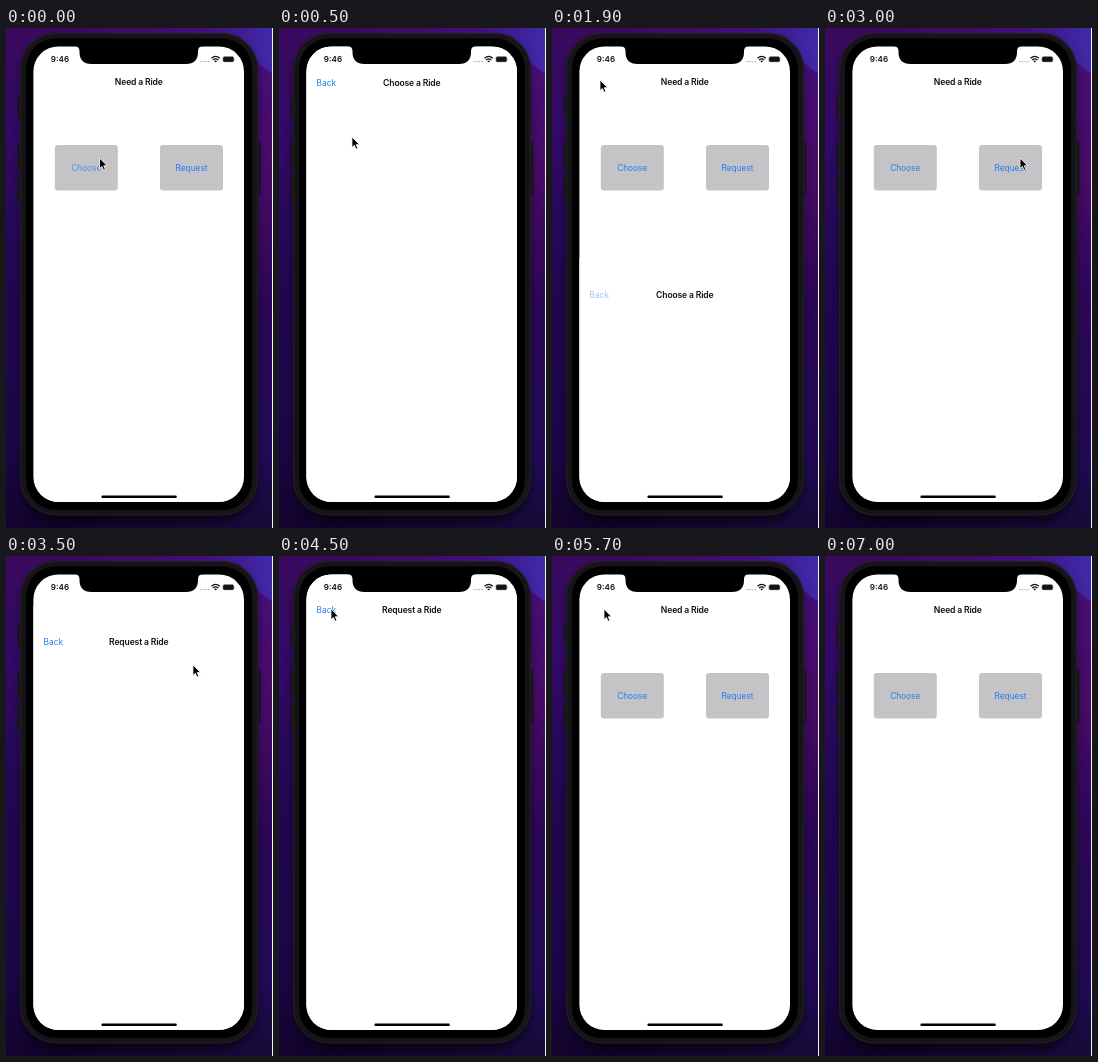
These frames come from a looping animation (267x500 px, 7.1 s). An HTML page:

```html
<!DOCTYPE html>
<html lang="en">
<head>
<meta charset="utf-8">
<title>Need a Ride</title>
<style>
  html, body { margin: 0; width: 100%; height: 100%; overflow: hidden; background: #1a0b40; }
  svg { display: block; width: 100%; height: 100%; }
  text { font: 400 8.3px Inter, Roboto, sans-serif; fill: #1f7cf2; }
  .title { font-weight: 600; font-size: 8.65px; letter-spacing: -.02em; fill: #111; text-anchor: middle; }
  .label { text-anchor: middle; }
  .clock { font-weight: 600; font-size: 8.1px; fill: #111; }
</style>
</head>
<body>
<svg viewBox="0 0 267 500" preserveAspectRatio="none">
  <defs>
    <linearGradient id="west" x2="0" y2="1">
      <stop offset="0" stop-color="#3a0a5e"/>
      <stop offset=".2" stop-color="#330a68"/>
      <stop offset=".5" stop-color="#220752"/>
      <stop offset=".85" stop-color="#1c0648"/>
      <stop offset="1" stop-color="#12042c"/>
    </linearGradient>
    <linearGradient id="east" x2="0" y2="1">
      <stop offset="0" stop-color="#46107c"/>
      <stop offset=".3" stop-color="#480b66"/>
      <stop offset=".55" stop-color="#2c0758"/>
      <stop offset=".85" stop-color="#220a56"/>
      <stop offset="1" stop-color="#170a38"/>
    </linearGradient>
    <linearGradient id="blue" x2="1">
      <stop offset="0" stop-color="#3a1478"/>
      <stop offset="1" stop-color="#4229aa"/>
    </linearGradient>
    <linearGradient id="fade">
      <stop offset=".2" stop-color="#fff" stop-opacity="0"/>
      <stop offset=".8" stop-color="#fff"/>
    </linearGradient>
    <mask id="eastSide"><rect width="267" height="500" fill="url(#fade)"/></mask>
    <filter id="blur" x="-20%" y="-10%" width="140%" height="120%"><feGaussianBlur stdDeviation="6"/></filter>
    <clipPath id="screen"><rect x="27.4" y="18.4" width="210.6" height="455.6" rx="25"/></clipPath>
  </defs>

  <rect width="267" height="500" fill="url(#west)"/>
  <rect width="267" height="500" fill="url(#east)" mask="url(#eastSide)"/>
  <path d="M200 0H267V46Q246 34 234 8Z" fill="url(#blue)"/>
  <rect x="16" y="14" width="234" height="480" rx="36" fill="#000" opacity=".6" filter="url(#blur)"/>
  <rect x="266" width="1" height="500" fill="#f4f2f8"/>

  <g fill="#17151b">
    <rect x="11.5" y="71" width="4" height="17" rx="1"/>
    <rect x="11.5" y="114" width="4" height="28" rx="1"/>
    <rect x="11.5" y="147" width="4" height="29" rx="1"/>
    <rect x="250" y="114" width="4.5" height="53" rx="1"/>
  </g>
  <rect x="14" y="5" width="238" height="482.5" rx="36" fill="#151517"/>
  <rect x="14.6" y="5.6" width="236.8" height="481.3" rx="35.4" fill="none" stroke="#252428" stroke-width=".8"/>
  <rect x="20" y="10.5" width="226" height="471.5" rx="30" fill="#000"/>

  <g clip-path="url(#screen)">
    <rect x="27" y="18" width="211" height="456" fill="#fff"/>
    <text class="title" x="132.8" y="57.3">Need a Ride</text>
    <rect x="48.8" y="117" width="63" height="45.5" rx="3" fill="#c4c4c6"/>
    <rect x="154" y="117" width="63" height="45.5" rx="3" fill="#c4c4c6"/>
    <text class="label" id="choose" x="80.2" y="142.6">Choose</text>
    <text class="label" id="request" x="185.5" y="142.6">Request</text>
    <g id="sheet">
      <rect x="27" y="18" width="211" height="456" fill="#fff"/>
      <text id="back" x="37.6" y="57.3">Back</text>
      <text class="title" id="heading" x="132.8" y="57.3"></text>
    </g>
    <text class="clock" x="44.8" y="34">9:46</text>
    <g fill="#bbb">
      <rect x="194" y="33" width="1.7" height="1.2"/><rect x="196.7" y="33" width="1.7" height="1.2"/>
      <rect x="199.4" y="33" width="1.7" height="1.2"/><rect x="202.1" y="33" width="1.7" height="1.2"/>
    </g>
    <g fill="none" stroke="#111" stroke-width="1.25">
      <path d="M205.5 30.2Q209.7 26.6 213.9 30.2M207.1 32Q209.7 29.8 212.3 32"/>
    </g>
    <path d="M208.2 33.1Q209.7 31.9 211.2 33.1L209.7 34.6Z" fill="#111"/>
    <rect x="216.9" y="28.6" width="11" height="5.4" rx="1.6" fill="#111" stroke="#999" stroke-width=".5"/>
    <path d="M228.9 30.4q1 .9 0 1.8z" fill="#777"/>
    <rect x="95.4" y="467.5" width="75.4" height="2.5" rx="1.25" fill="#000"/>
  </g>
  <path d="M68.5 18Q73.5 18.4 73.5 23V24Q73.5 36 85.5 36H180Q192 36 192 24V23Q192 18.4 197 18Z" fill="#000"/>

  <path id="cursor" d="M0 0V10.6L2.4 8.4L4.1 12.2L5.9 11.4L4.2 7.7H7.6Z" fill="#000" stroke="#fff" stroke-width=".8" stroke-linejoin="round"/>
</svg>
<script>
const LOOP = 7100, HEIGHT = 456, OMEGA = 18.26;
const el = id => document.getElementById(id);
const [choose, request, sheet, back, heading, cursor] =
  ["choose", "request", "sheet", "back", "heading", "cursor"].map(el);

const visits = [
  { title: "Choose a Ride", open: -5, close: 1815 },
  { title: "Request a Ride", open: 3263, close: 4758 }
];

// time, x, y of the pointer tip
const path = [
  [0, 93.5, 130], [500, 73, 109], [850, 60, 74], [1400, 48, 52], [2050, 48, 52],
  [2500, 195, 130], [3200, 195, 130], [3500, 187, 109], [3700, 165, 64],
  [4000, 105, 57], [4400, 52, 53], [5950, 52, 53], [6500, 93.5, 130], [7100, 93.5, 130]
];

// Share of the way still to go in a critically damped spring
function spring(ms) {
  const x = OMEGA * Math.max(0, ms) / 1000;
  return (1 + x) * Math.exp(-x);
}

// Button label dims while pressed and fades back after release
function dim(t, release, low, hold) {
  if (t < release - hold || t > release + 300) return 1;
  return low + (1 - low) * Math.max(0, t - release) / 300;
}

function slope(i, k) {
  const a = path[i - 1], b = path[i], c = path[i + 1];
  if (!a || !c || a[k] === b[k] || b[k] === c[k]) return 0;
  return (c[k] - a[k]) / (c[0] - a[0]);
}

function pointer(t) {
  let i = 0;
  while (i < path.length - 2 && t >= path[i + 1][0]) i++;
  const a = path[i], b = path[i + 1], d = b[0] - a[0], u = (t - a[0]) / d;
  const s = u * u * (3 - 2 * u);
  return [1, 2].map(k => a[k] + (b[k] - a[k]) * s
    + d * u * (1 - u) * ((1 - u) * slope(i, k) - u * slope(i + 1, k)));
}

function draw(t) {
  const v = t < visits[1].open ? visits[0] : visits[1];
  const left = t < v.close ? spring(t - v.open) : 1 - spring(t - v.close);
  sheet.setAttribute("transform", `translate(0 ${(left * HEIGHT).toFixed(2)})`);
  heading.textContent = v.title;
  back.setAttribute("opacity", dim(t, v.close, .22, 60));
  choose.setAttribute("opacity", dim(t, visits[0].open, .7, 0));
  request.setAttribute("opacity", dim(t, visits[1].open, .3, 60));
  const [x, y] = pointer(t);
  cursor.setAttribute("transform", `translate(${x.toFixed(2)} ${y.toFixed(2)})`);
  cursor.setAttribute("visibility", t < 7000 ? "visible" : "hidden");
}

const start = performance.now();
function tick() {
  draw((performance.now() - start) % LOOP);
  requestAnimationFrame(tick);
}
tick();
</script>
</body>
</html>
```
